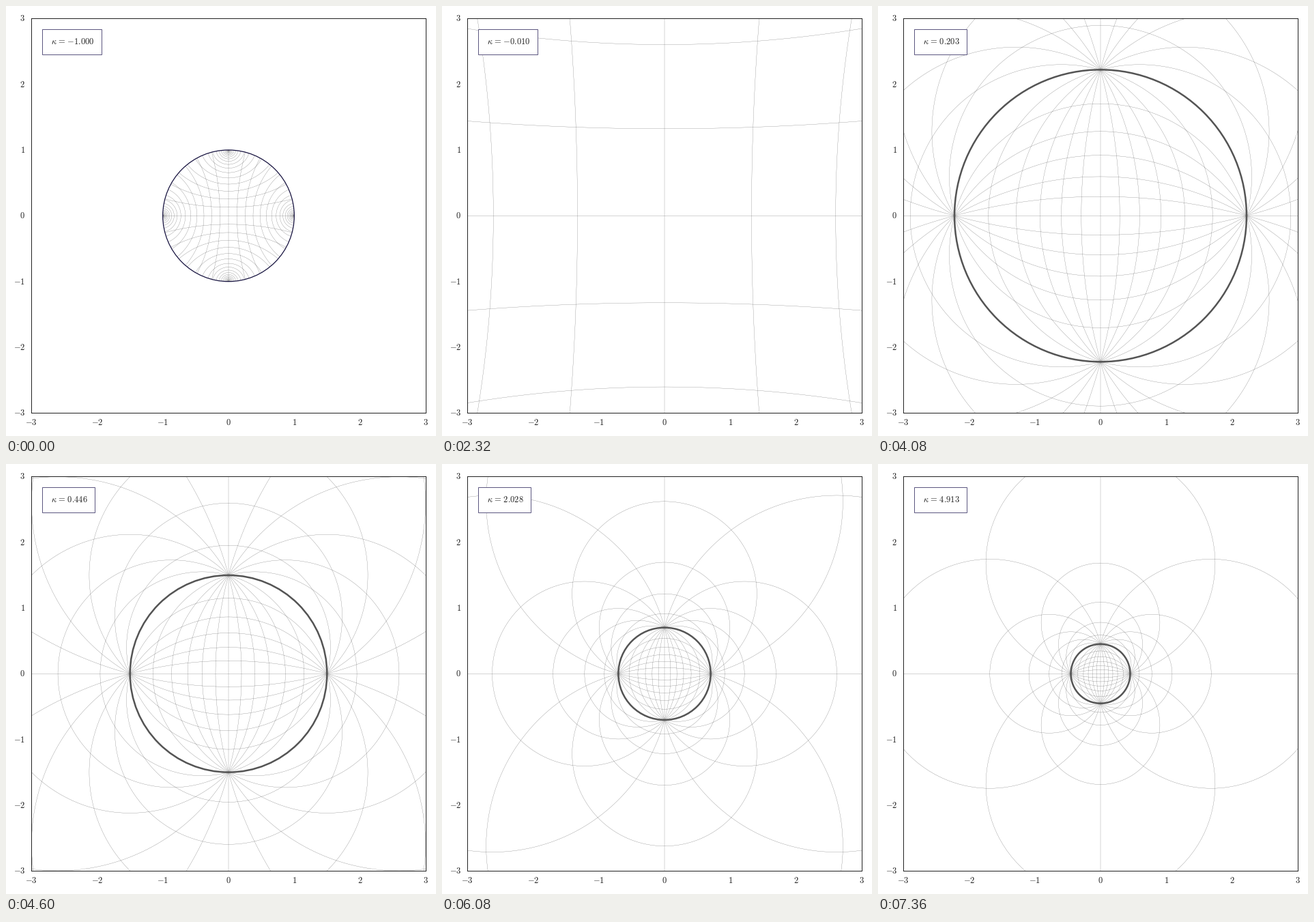
These frames come from a looping animation (630 px wide and 630 px high, 7.4 s). A matplotlib script:

```python
import numpy as np
import matplotlib.pyplot as plt
from matplotlib.animation import FuncAnimation
from matplotlib.collections import LineCollection
from matplotlib.patches import Circle, Rectangle

plt.rcParams["mathtext.fontset"] = "cm"

SIZE, DPI = 630, 90
LEFT, TOP, SIDE = 37, 18.3, 578
INK, NAVY, GRAY = "#222222", "#16123f", "#545454"
STEP = np.pi / 12

# Curvature is the cube of a linear ramp; the nearly flat part is skipped.
ramp = np.linspace(-1, 1.7, 200)
kappas = ramp[np.abs(ramp) > 0.1] ** 3

fig = plt.figure(figsize=(SIZE / DPI, SIZE / DPI), dpi=DPI, facecolor="white")
ax = fig.add_axes([LEFT / SIZE, 1 - (TOP + SIDE) / SIZE, SIDE / SIZE, SIDE / SIZE])
ax.set(xlim=(-3, 3), ylim=(-3, 3), xticks=[], yticks=[])
for spine in ax.spines.values():
    spine.set(linewidth=0.8, edgecolor=INK)


def label(x, y, s, ha):
    """Place text by its baseline, in pixels from the top left corner."""
    return fig.text(x / SIZE, 1 - y / SIZE, s, ha=ha, va="baseline",
                    fontsize=10, color=INK)


for v in range(-3, 4):
    offset = (v + 3) * SIDE / 6
    label(LEFT + offset, 614, f"${v}$", "center")
    label(LEFT - 9, TOP + SIDE - offset + 4.2, f"${v}$", "right")

grid = LineCollection([], linewidths=0.2, colors="0.35", zorder=1, snap=False)
ax.add_collection(grid)
rim = Circle((0, 0), 1, fill=False, zorder=2)
ax.add_patch(rim)
box = Rectangle((53, SIZE - 71), 87, 37, transform=None, facecolor="white",
                edgecolor="#5c5780", linewidth=0.8)
fig.add_artist(box)
box.set_zorder(3)
value = label(66.2, 56, "", "left")
value.set_zorder(4)


def geodesics(sign):
    """Curves perpendicular to the x axis at equal distances, unit radius."""
    if sign < 0:
        n = np.r_[-24:0, 1:25]
        t = np.linspace(-8, 8, 321)
        sin, cos = np.sinh, np.cosh
    else:
        n = np.arange(1, 12)
        t = np.linspace(-np.pi, np.pi, 601)
        sin, cos = np.sin, np.cos
    a = n[:, None] * STEP
    depth = 1 + cos(a) * cos(t)
    return np.stack([sin(a) * cos(t) / depth, sin(t) / depth], axis=-1)


curves = {sign: geodesics(sign) for sign in (-1, 1)}


def draw(i):
    k = kappas[i]
    sign = 1 if k > 0 else -1
    radius = 1 / np.sqrt(abs(k))
    reach = 4 if k > 0 else min(radius, 4)
    axis = np.array([[0, -reach], [0, reach]])
    upright = [*(curves[sign] * radius), axis]
    grid.set_segments(upright + [c[:, ::-1] for c in upright])

    rim.set_radius(radius)
    rim.set(edgecolor=GRAY if k > 0 else NAVY, linewidth=2 if k > 0 else 1)
    box.set_width(77 if k > 0 else 87)
    number = f"{k:.3f}".replace("-", "{-}")
    value.set_text(r"$\kappa\hspace{0.117}=\hspace{0.117}" + number + "$")
    return grid, rim, box, value


anim = FuncAnimation(fig, draw, frames=len(kappas), interval=40,
                     repeat=True, repeat_delay=0, blit=False)
plt.show()
```
